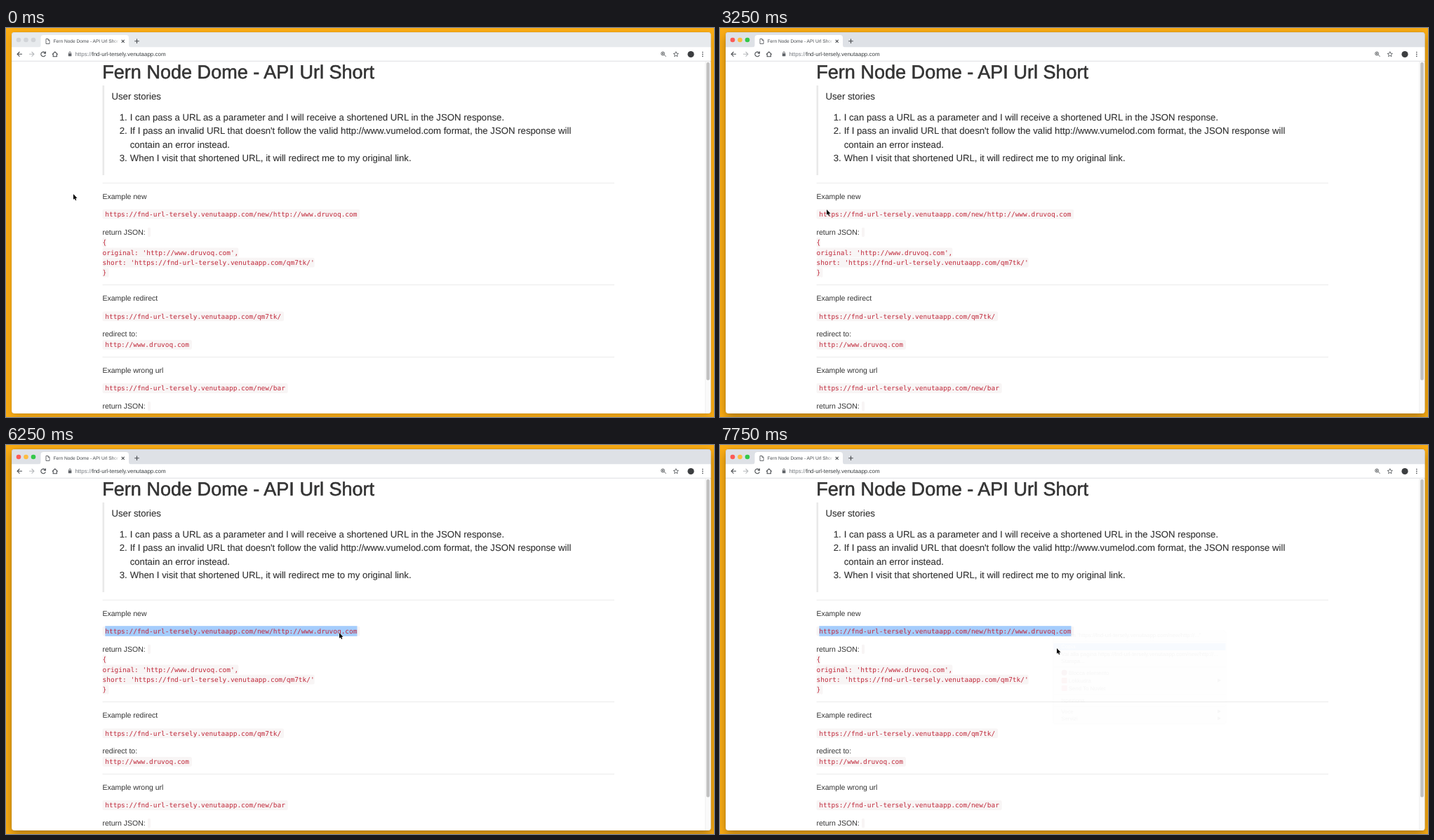
These frames come from a looping animation (1009 px wide and 555 px high, 8000 ms). An HTML page:

```html
<!DOCTYPE html>
<html lang="en">
<head>
<meta charset="utf-8">
<title>URL shortener demo</title>
<style>
  html, body { margin: 0; width: 100%; height: 100%; overflow: hidden; background: #fbad14; }
  svg { display: block; width: 1009px; height: 555px; }
  text { font-family: "Liberation Sans", Arial, sans-serif; fill: #333; text-rendering: geometricPrecision; }
  .title { font-size: 27.05px; stroke: #333; stroke-width: .55px; }
  .story { font-size: 13.19px; stroke: #333; stroke-width: .12px; }
  .body { font-size: 10.5px; }
  .code { font-family: "DejaVu Sans Mono", monospace; font-size: 9.47px; fill: #c0283a; }
  .tab { font-size: 6.6px; fill: #45494d; }
  .address { font-size: 8px; fill: #3c4043; }
  .item { font-size: 7.8px; fill: #222; }
  .picked { fill: #fff; }
  .icon { fill: none; stroke: #4a4d51; stroke-width: 1.1; }
</style>
</head>
<body>
<svg id="stage" viewBox="0 0 1009 555">
  <defs>
    <linearGradient id="fade"><stop stop-color="#fff" stop-opacity="0"/><stop offset="1" stop-color="#fff"/></linearGradient>
    <clipPath id="window"><rect x="8" y="6" width="996.5" height="544" rx="4"/></clipPath>
    <filter id="blur" x="-10%" y="-10%" width="120%" height="125%"><feGaussianBlur stdDeviation="3"/></filter>
    <filter id="wideBlur" x="-5%" y="-5%" width="110%" height="115%"><feGaussianBlur stdDeviation="7"/></filter>
  </defs>
  <rect width="1009" height="555" fill="#fbad14"/>
  <rect id="shadow" x="8" y="11" width="996.5" height="544" rx="4" filter="url(#wideBlur)"/>
  <g clip-path="url(#window)">
    <rect x="8" y="6" width="997" height="544" fill="#fff"/>
    <g id="page"></g>
    <g id="chrome"></g>
  </g>
  <rect x="8" y="6" width="996.5" height="544" rx="4" fill="none" stroke="#000" stroke-opacity=".12" stroke-width=".7"/>
  <rect id="halo" x="465.5" y="257" width="264.5" height="152" fill="#f3f3f3"/>
  <g id="menu"></g>
  <path id="cursor" d="M0 0V7.8L1.8 6.2L3 9L4.3 8.4L3.1 5.7H5.5Z" fill="#000" stroke="#fff" stroke-width=".9" paint-order="stroke"/>
</svg>
<script>
const $ = id => document.getElementById(id);
const LEFT = 137.5, CHAR = 5.701, PAD = 3.8;
const HOST = 'https://fnd-url-tersely.venutaapp.com';
const SITE = 'http://www.druvoq.com';
const NEW_URL = `${HOST}/new/${SITE}`;
const SHORT_URL = `${HOST}/qm7tk/`;
const TITLE = 'Fern Node Dome - API Url Short';

const rect = (x, y, w, h, fill, extra = '') =>
  `<rect x="${x}" y="${y}" width="${w}" height="${h}" fill="${fill}" ${extra}/>`;
const text = (cls, x, y, str, extra = '') => `<text class="${cls}" x="${x}" y="${y}" ${extra}>${str}</text>`;
const icon = (d, extra = '') => `<path class="icon" d="${d}" ${extra}/>`;
const dot = (x, y, r, fill, extra = '') => `<circle cx="${x}" cy="${y}" r="${r}" fill="${fill}" ${extra}/>`;
const body = (y, str) => text('body', LEFT, y, str);
const rule = y => rect(LEFT, y, 729.5, 1, '#ebebeb');
const codeBox = (x, y, w) => rect(x, y - 10.2, w, 13.8, '#f8f5f5', 'rx="2"');
const codeText = (y, str, pad) => text('code', LEFT + pad, y, str);
const code = (y, str, pad = PAD) =>
  codeBox(LEFT, y, str.length * CHAR + 2 * pad) + codeText(y, str, pad);
const returnLabel = y => body(y, 'return JSON:') + codeBox(202, y, 4);

$('page').innerHTML = [
  text('title', 137.3, 72, TITLE),
  rect(LEFT, 82, 2.6, 128, '#e9e9e9'),
  text('story', 150.5, 101.6, 'User stories'),
  ...['I can pass a URL as a parameter and I will receive a shortened URL in the JSON response.',
    "If I pass an invalid URL that doesn't follow the valid http://www.vumelod.com format, the JSON response will",
    'contain an error instead.',
    'When I visit that shortened URL, it will redirect me to my original link.',
  ].map((line, i) => text('story', 176.7, 131.7 + 19.5 * i, line)),
  ...[0, 1, 3].map((row, i) => text('story', 161.7, 131.7 + 19.5 * row, `${i + 1}.`)),
  rule(220.7),
  body(243.7, 'Example new'),
  codeBox(LEFT, 269, NEW_URL.length * CHAR + 2 * PAD),
  rect(LEFT + PAD, 258.2, 0, 14.6, '#a5cdfd', 'id="selection"'),
  codeText(269, NEW_URL, PAD),
  returnLabel(294.7),
  code(309.3, '{', 0),
  code(323.7, `original: '${SITE}',`, 0),
  code(338, `short: '${SHORT_URL}'`, 0),
  code(352.2, '}', 0), codeBox(143, 352.2, 3.5),
  rule(366),
  body(389.3, 'Example redirect'),
  code(414.7, SHORT_URL),
  body(440.4, 'redirect to:'),
  code(455.2, SITE),
  rule(469),
  body(492, 'Example wrong url'),
  code(517.3, `${HOST}/new/bar`),
  returnLabel(543),
  rect(996.7, 48, 8, 502, '#fafafa'), rect(996.5, 48, .6, 502, '#e6e6e6'),
  rect(998.2, 49, 4.6, 453.5, '#c1c1c1', 'rx="2"'),
].join('');

$('chrome').innerHTML = [
  rect(8, 6, 997, 21.5, '#dee1e6', 'id="strip"'),
  rect(8, 27.5, 997, 19.5, '#fff'),
  rect(8, 46.8, 997, .8, '#d4d6d9'),
  '<path d="M45 28Q49.5 28 49.5 24V14Q49.5 10 53.5 10H171Q175 10 175 14V24Q175 28 179 28Z" fill="#fff"/>',
  ...['#fc5b57', '#fdbc40', '#34c84a'].map((c, i) => dot(18 + 10.5 * i, 17, 3.3, c, 'class="light"')),
  icon('M57 15.5H60L62 17.5V22.5H57ZM60 15.5V17.5H62', 'style="stroke-width:.8"'),
  text('tab', 67.5, 21.2, TITLE),
  rect(151, 13, 10, 12, 'url(#fade)'), rect(161, 13, 11, 12, '#fff'),
  icon('M164.7 16.8L168.7 20.8M168.7 16.8L164.7 20.8'),
  icon('M183.2 18.8H189.8M186.5 15.5V22.1'),
  icon('M23 37.3H16.2M19.4 34L16.1 37.3L19.4 40.6'),
  icon('M33 37.3H39.8M36.6 34L39.9 37.3L36.6 40.6', 'style="stroke:#b5b8bb"'),
  icon('M55.6 35.2A3.3 3.3 0 1 0 56.3 38.3M56.4 33.5V36.1H53.7'),
  icon('M66 37.6L69.8 34L73.6 37.6M67.2 37V40.7H72.4V37'),
  rect(88.8, 36.3, 4.6, 4, '#5f6368', 'rx=".5"'),
  icon('M89.8 36.5V35.3A1.3 1.3 0 0 1 92.4 35.3V36.5', 'style="stroke-width:.8"'),
  text('address', 98.4, 40.1, `<tspan fill="#777b80">https://</tspan>${HOST.slice(8)}`),
  icon('M938.5 36.5A2.4 2.4 0 1 1 933.7 36.5A2.4 2.4 0 1 1 938.5 36.5M938 38.3L940.5 40.8M934.9 36.5H937.3M936.1 35.3V37.7', 'style="stroke-width:.9"'),
  icon('M954.8 33.7L955.8 36.2L958.4 36.4L956.4 38.1L957 40.7L954.8 39.3L952.6 40.7L953.2 38.1L951.2 36.4L953.8 36.2Z', 'style="stroke-width:.8"'),
  dot(976, 37.5, 4.6, '#3c3e40'),
  ...[34.5, 37.4, 40.3].map(y => dot(992.8, y, .85, '#55585c')),
].join('');

const badge = (y, fill) => rect(486.7, y, 8, 8, fill, 'rx="1"');
const arrow = y => `<path d="M709.3 ${y - 2.6}L714 ${y}L709.3 ${y + 2.6}Z" fill="#222"/>`;
$('menu').innerHTML = [
  rect(475, 268, 246, 131, '#000', 'rx="4" opacity=".3" filter="url(#blur)"'),
  rect(475, 264.7, 245.7, 132.8, '#ededed', 'rx="3" stroke="#bdbdbd" stroke-width=".7"'),
  ...[279.5, 316.5, 355.2, 371.7].map(y => rect(475.4, y, 245, .9, '#d6d6d6')),
  rect(475.4, 282.8, 245, 10.2, '#3b87f7', 'id="highlight"'),
  ...[[274.2, `Cerca "${HOST}/new/http://..."`], [290.4, 'Copia', 'id="copy"'],
    [300.6, `Vai alla pagina ${HOST}/new/http://...`], [310.8, 'Stampa...'],
    [366.5, 'Ispeziona'], [382.7, 'Voce'], [392.8, 'Servizi'],
  ].map(([y, str, extra]) => text('item', 486.3, y, str, extra)),
  ...[[327.6, 'Blocca elemento'], [338.6, 'Lokkudra'], [349.6, 'Send To Nuvlet'],
  ].map(([y, str]) => text('item', 496.8, y, str)),
  dot(490.6, 324.7, 4, '#84161b'), badge(332, '#d8322c'), badge(343, '#ec4457'),
  ...[335.8, 380, 390].map(arrow),
].join('');

// Pointer path: [ms, x, y]
const path = [
  [0, 96, 237], [250, 97, 238], [500, 106, 243], [750, 121, 253], [1000, 134, 262], [1250, 140, 265],
  [1500, 140, 265], [2000, 296, 284], [2250, 296, 284], [2750, 225, 262], [3000, 180, 256],
  [3250, 152, 259], [3500, 143, 263], [4000, 140, 264.5], [4250, 140, 264.5],
  [4750, 280, 270], [5000, 404, 279], [5250, 472, 263], [5500, 494, 266], [5750, 494, 268],
  [6250, 475, 268], [6500, 472, 267], [7000, 498, 283.5], [7750, 480, 290],
];

function pointerAt(t) {
  const next = path.findIndex(key => key[0] >= t);
  if (next < 1) return path[0].slice(1);
  const [t0, x0, y0] = path[next - 1], [t1, x1, y1] = path[next];
  const k = (t - t0) / (t1 - t0);
  return [x0 + (x1 - x0) * k, y0 + (y1 - y0) * k];
}

function draw(now) {
  const t = Math.floor(now % 8000 / 250) * 250;
  const [x, y] = pointerAt(t);
  $('cursor').setAttribute('transform', `translate(${x} ${y})`);

  const active = t >= 1500;
  $('shadow').setAttribute('opacity', active ? .32 : .15);
  $('strip').style.fill = active ? '#dee1e6' : '#e7eaed';
  for (const light of document.querySelectorAll('.light')) light.style.fill = active ? '' : '#d1d4d8';

  const chars = t < 4500 ? 0 : t < 5500 ? Math.round((x - LEFT - PAD) / CHAR) : NEW_URL.length;
  $('selection').setAttribute('width', Math.max(0, chars) * CHAR);

  const picked = t >= 7250;
  $('menu').setAttribute('opacity', t < 6500 ? 0 : t < 7750 ? 1 : .035);
  $('halo').setAttribute('opacity', t >= 6500 && t < 6750 ? 1 : 0);
  $('highlight').setAttribute('opacity', picked ? 1 : 0);
  $('copy').classList.toggle('picked', picked);
}

const start = performance.now();
(function frame() {
  draw(performance.now() - start);
  requestAnimationFrame(frame);
})();
</script>
</body>
</html>
```
